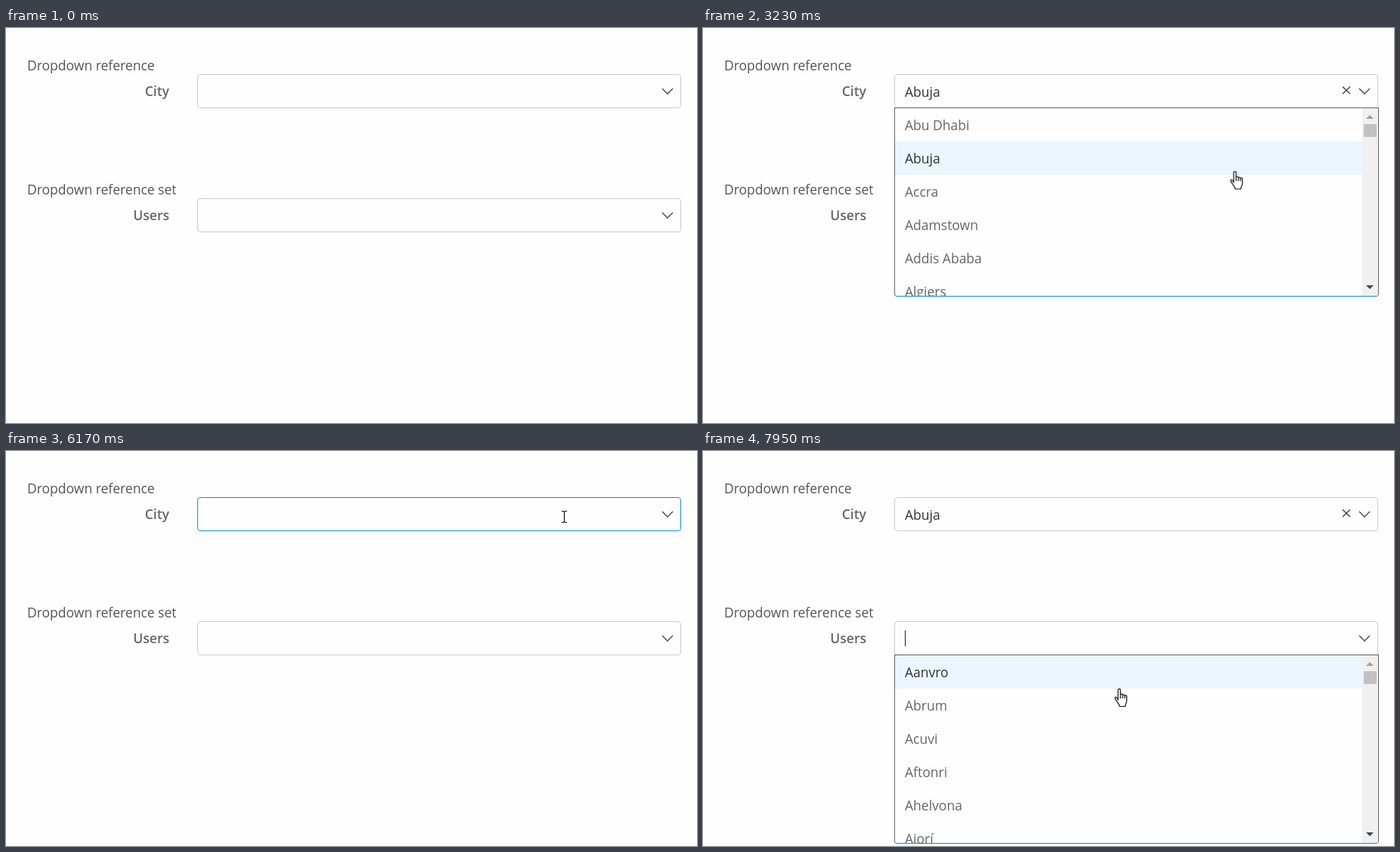
Recreate the animation shown at these times as an HTML page. Size 914x522 px, loop 8 s.

```html
<!DOCTYPE html>
<html lang="en">
<head>
<meta charset="utf-8">
<title>Dropdown references</title>
<style>
  html, body { margin: 0; width: 100%; height: 100%; overflow: hidden; background: #fefefe; }
  body { position: relative; font: 17.5px/44px "Open Sans", sans-serif; color: #666; }
  body * { position: absolute; box-sizing: border-box; white-space: nowrap; }

  .title { left: 28px; color: #555; }
  .label { right: calc(100% - 216px); font-weight: 600; }
  .field { left: 253px; width: 640px; height: 45px; border: 1px solid #ccc; border-radius: 4px; }
  .field span { left: 13px; color: #333; }
  .field svg { left: 590px; top: 10px; fill: none; stroke: #444; stroke-width: 1.4; }
  .caret { left: 13px; top: 11px; width: 1px; height: 21px; background: #222; }

  .list {
    left: 253px; width: 641px; height: 250px; overflow: hidden; background: #fefefe;
    border: 1px solid #666; border-bottom-color: #0595db; border-radius: 0 0 4px 4px;
  }
  .row { position: relative; width: 618px; height: 44px; padding-left: 13px; }
  .row.on { background: #eaf5ff; color: #333; }
  .bar { right: 0; top: 0; width: 21px; height: 100%; background: #f0f0f0; }
  .bar i { left: 2px; top: 21px; width: 17px; height: 17px; background: #c1c1c1; }
  .bar svg { left: 5px; top: 0; }

  /* One loop is 8 s, so 1% is 80 ms. */
  .t { animation: 8s step-end infinite; }
  #city { top: 61px; animation-name: cityFocus; }
  #users { top: 225px; }
  #cityList { top: 105px; animation-name: cityOpen; }
  #usersList { top: 269px; animation-name: usersOpen; }
  #cityCaret { animation-name: cityCaret; }
  #usersCaret { animation-name: usersOpen; }
  #first { animation-name: first; }
  #second { animation-name: second; }
  #clear { animation: clear 8s linear infinite; }
  #row0 { animation-name: row0; }
  #row1 { animation-name: row1; }
  #row2 { animation-name: row2; }
  #row3 { animation-name: row3; }
  #pointer { left: 0; top: 0; animation: move 8s ease-in-out infinite; }
  #pointer svg { left: -20px; top: -20px; fill: #fff; stroke: #111; stroke-linejoin: round; }
  #click { left: -15px; top: -15px; width: 30px; height: 30px; border-radius: 50%; background: rgba(255, 255, 0, .5); animation-name: click; }
  #arrow { animation-name: arrow; }
  #hand { animation-name: hand; }
  #beam { animation-name: beam; }

  @keyframes cityFocus {
    0%, 32.5%, 78.125%, 93.25%, 100% { border-color: #ccc; }
    21%, 48.875%, 86.9% { border-color: #0595db; }
  }
  @keyframes cityOpen {
    0%, 21%, 48.875%, 86.9%, 100% { opacity: 0; }
    10.25%, 32.5%, 78.125% { opacity: 1; }
  }
  @keyframes usersOpen {
    0% { opacity: 0; }
    94%, 100% { opacity: 1; }
  }
  @keyframes cityCaret {
    0%, 16.9%, 84.75%, 100% { opacity: 0; }
    10.25%, 78.125% { opacity: 1; }
  }
  @keyframes first {
    0%, 48.875% { opacity: 0; }
    21%, 86.9%, 100% { opacity: 1; }
  }
  @keyframes second {
    0%, 66.25%, 100% { opacity: 0; }
    48.875% { opacity: 1; }
  }
  @keyframes clear {
    0%, 21%, 67.5%, 86.75% { opacity: 0; }
    23%, 66.25%, 88.75%, 100% { opacity: 1; }
  }
  @keyframes row0 {
    0%, 14.34%, 38.9%, 83.3%, 100% { background: #fefefe; color: #666; }
    10.25%, 37.94%, 78.125% { background: #eaf5ff; color: #333; }
  }
  @keyframes row1 {
    0%, 21%, 37.94%, 40.8%, 86.9%, 100% { background: #fefefe; color: #666; }
    14.34%, 32.5%, 38.9%, 83.3% { background: #eaf5ff; color: #333; }
  }
  @keyframes row2 {
    0%, 43%, 100% { background: #fefefe; color: #666; }
    40.8% { background: #eaf5ff; color: #333; }
  }
  @keyframes row3 {
    0%, 48.875%, 100% { background: #fefefe; color: #666; }
    43% { background: #eaf5ff; color: #333; }
  }
  @keyframes move {
    0%, .875% { transform: translate(721px, 401px); animation-timing-function: ease-out; }
    8.375% { transform: translate(615px, 93px); }
    10.25%, 13.125% { transform: translate(617px, 87px); }
    19.25%, 23% { transform: translate(587px, 182px); }
    30.75% { transform: translate(740px, 86px); }
    37.375% { transform: translate(740px, 86px); animation-timing-function: ease-in; }
    40.375% { transform: translate(704px, 189px); animation-timing-function: ease-out; }
    46%, 53.75% { transform: translate(683px, 270px); }
    58.75%, 61% { transform: translate(807px, 240px); }
    61.625% { transform: translate(807px, 233px); }
    66.25%, 68.5% { transform: translate(849px, 69px); }
    76.25%, 82.875% { transform: translate(738px, 87px); }
    84.75%, 88% { transform: translate(620px, 190px); }
    92.5%, 96.75% { transform: translate(605px, 257px); }
    99.375%, 100% { transform: translate(551px, 314px); }
  }
  @keyframes click {
    0%, 13.125%, 23%, 37.375%, 50.3%, 68.5%, 82.5%, 88%, 97.25%, 100% { opacity: 0; }
    10.25%, 21%, 32.5%, 48.875%, 66.25%, 78.125%, 86.9%, 93.25% { opacity: 1; }
  }
  @keyframes arrow {
    0%, 7.75%, 29.125%, 71.25%, 91.25%, 100% { opacity: 0; }
    .875%, 21%, 48.875%, 86.9% { opacity: 1; }
  }
  @keyframes hand {
    0%, 21%, 48.875%, 86.9% { opacity: 0; }
    14.34%, 37.94%, 83.125%, 97.375%, 100% { opacity: 1; }
  }
  @keyframes beam {
    0%, 14.34%, 37.94%, 83.125%, 97.375%, 100% { opacity: 0; }
    7.75%, 29.125%, 71.25%, 91.25% { opacity: 1; }
  }
</style>
</head>
<body>
  <div class="title" style="top:27px">Dropdown reference</div>
  <div class="label" style="top:61px">City</div>
  <div id="city" class="field t">
    <span id="first" class="t">Abuja</span>
    <span id="second" class="t">Adamstown</span>
    <div id="cityCaret" class="caret t"></div>
    <svg width="45" height="24">
      <path id="clear" d="M2 5.5l10 9.5M12 5.5L2 15"/>
      <path d="M24 8l7 7 7-7"/>
    </svg>
  </div>

  <div class="title" style="top:191px">Dropdown reference set</div>
  <div class="label" style="top:225px">Users</div>
  <div id="users" class="field">
    <div id="usersCaret" class="caret t"></div>
    <svg width="45" height="24"><path d="M24 8l7 7 7-7"/></svg>
  </div>

  <div id="cityList" class="list t">
    <div id="row0" class="row t">Abu Dhabi</div>
    <div id="row1" class="row t">Abuja</div>
    <div id="row2" class="row t">Accra</div>
    <div id="row3" class="row t">Adamstown</div>
    <div class="row">Addis Ababa</div>
    <div class="row">Algiers</div>
    <div class="bar"><i></i><svg width="11" height="248"><path fill="#a0a0a0" d="M0 14l5-5 5 5z"/><path fill="#444" d="M0 234h10l-5 5z"/></svg></div>
  </div>

  <div id="usersList" class="list t">
    <div class="row on">Aanvro</div>
    <div class="row">Abrum</div>
    <div class="row">Acuvi</div>
    <div class="row">Aftonri</div>
    <div class="row">Ahelvona</div>
    <div class="row">Ajorí</div>
    <div class="bar"><i></i><svg width="11" height="248"><path fill="#a0a0a0" d="M0 14l5-5 5 5z"/><path fill="#444" d="M0 234h10l-5 5z"/></svg></div>
  </div>

  <div id="pointer">
    <div id="click" class="t"></div>
    <svg width="60" height="60" viewBox="-20 -20 60 60">
      <path id="arrow" class="t" d="M.5.5V16.5L4 13.2 6.6 19.2 9.2 18 6.6 12.2H11.6Z"/>
      <path id="hand" class="t" d="M-2 15V2a1.6 1.6 0 0 1 3.2 0V8.5a1.5 1.5 0 0 1 3 .3a1.5 1.5 0 0 1 2.8.6a1.4 1.4 0 0 1 2.5.6V16c0 3-2 4-2 7.5H0C0 20-6 15-6 12.5c0-2 2-2 4 2.5zM1.2 8.5V13M4.2 8.8V13M7 9.4V13" stroke-width="1.2"/>
      <path id="beam" class="t" fill="none" d="M-3-7.5H-1L.5-6.5 2-7.5H4M.5-6.5V6.5M-3 7.5H-1L.5 6.5 2 7.5H4" stroke-width="1.2"/>
    </svg>
  </div>
</body>
</html>
```
